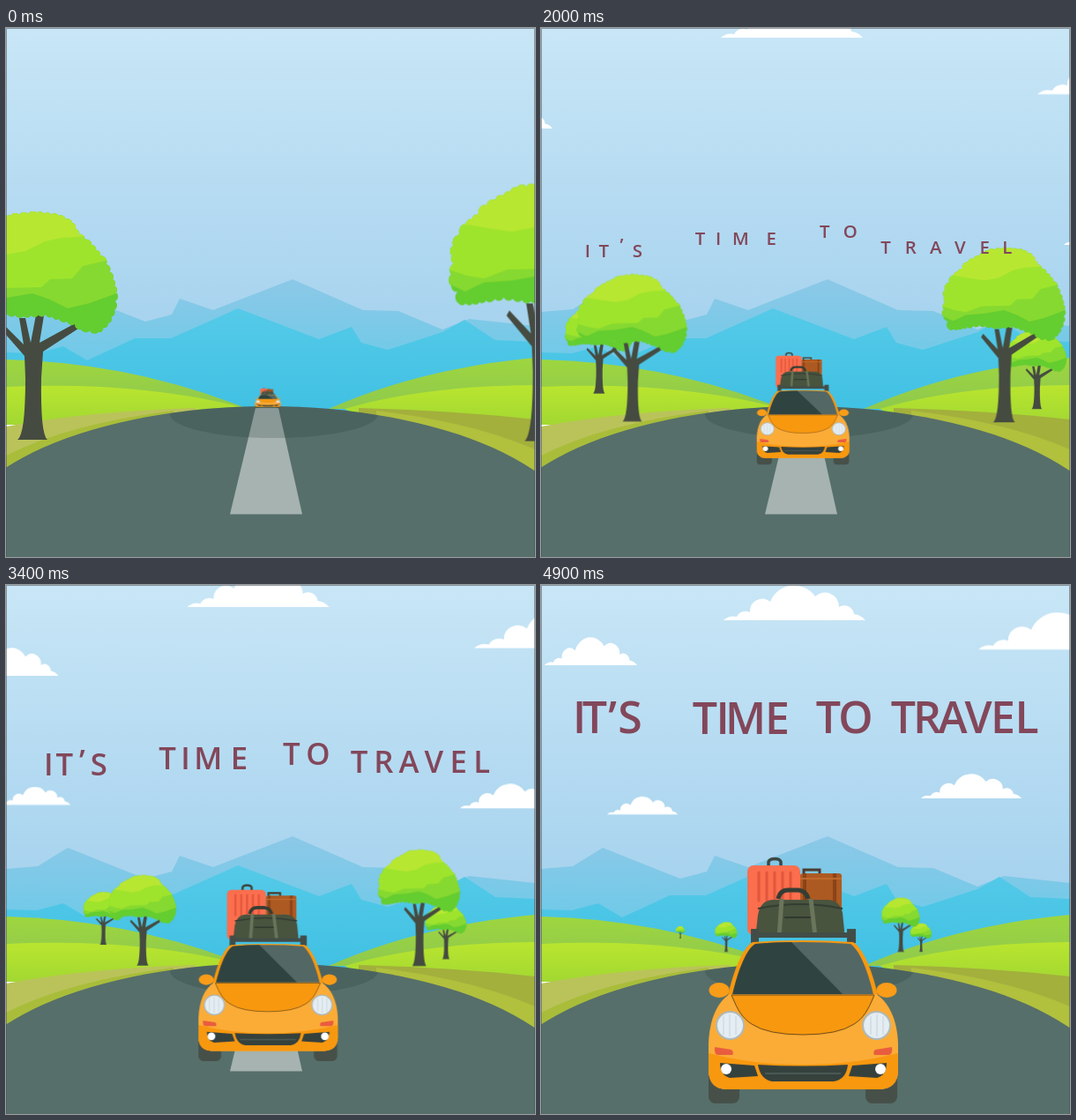
Animation of 600x600 px, one loop 5000 ms. Source, as an HTML page:

```html
<!DOCTYPE html>
<html lang="en">
<head>
<meta charset="utf-8">
<title>It's time to travel</title>
<style>
html, body { margin: 0; width: 100%; height: 100%; overflow: hidden; }
svg { display: block; width: 100vw; height: 100vh; }

/* Motion is stepped at ten pictures a second. */
.go { animation: go 5s steps(50) infinite; }
@keyframes go { from { transform: var(--a); } to { transform: var(--b); } }

#treeB { animation: treeB 5s infinite; }
@keyframes treeB {
  0% { transform: translate(-41px, 373.7px) scale(.63); animation-timing-function: steps(18); }
  36% { transform: translate(59.4px, 415.6px) scale(.42); animation-timing-function: steps(32); }
  100% { transform: translate(161.2px, 400.6px) scale(.042); }
}
#treeD { animation: treeD 5s infinite; }
@keyframes treeD {
  0% { transform: translate(730px, 450px) scale(.5); animation-timing-function: steps(14); }
  28% { transform: translate(589.5px, 435.5px) scale(.398); animation-timing-function: steps(36); }
  100% { transform: translate(426.5px, 415.4px) scale(.116); }
}
#cloudR { animation: cloudR 5s infinite; }
@keyframes cloudR {
  0% { transform: translate(609px, 86px); animation-timing-function: steps(20); }
  40% { transform: translate(563px, 75px); animation-timing-function: steps(8); }
  56% { transform: translate(544.5px, 72px); animation-timing-function: steps(11); }
  78% { transform: translate(519.5px, 71.2px); animation-timing-function: steps(11); }
  100% { transform: translate(493.7px, 73.2px); }
}
#lowL { animation: lowL 5s infinite; }
@keyframes lowL {
  0% { transform: translate(-193px, 212px); animation-timing-function: steps(28); }
  56% { transform: translate(-40px, 243px); animation-timing-function: steps(11); }
  78% { transform: translate(20px, 254px); animation-timing-function: steps(11); }
  100% { transform: translate(80.5px, 260.7px); }
}
#lowR { animation: lowR 5s infinite; }
@keyframes lowR {
  0% { transform: translate(704px, 228px); animation-timing-function: steps(20); }
  40% { transform: translate(593px, 246px); animation-timing-function: steps(8); }
  56% { transform: translate(549px, 252px); animation-timing-function: steps(6); }
  68% { transform: translate(515px, 253.3px); animation-timing-function: steps(5); }
  78% { transform: translate(487px, 252px); animation-timing-function: steps(11); }
  100% { transform: translate(425.5px, 241px); }
}
#words { font: 600 50px "Open Sans", "Noto Sans", sans-serif; fill: #83475a; text-anchor: middle; }
</style>
</head>
<body>
<svg viewBox="0 0 600 600">
  <defs>
    <linearGradient id="sky" x2="0" y2="1">
      <stop stop-color="#c8e6f6"/><stop offset="1" stop-color="#9dcdec"/>
    </linearGradient>
    <linearGradient id="far" x2="0" y2="1">
      <stop stop-color="#8cc8e7"/><stop offset=".6" stop-color="#6fcae8"/>
    </linearGradient>
    <linearGradient id="near" x2="0" y2="1">
      <stop stop-color="#55cae8"/><stop offset="1" stop-color="#3fc0e3"/>
    </linearGradient>
    <linearGradient id="hill" x2="0" y2="1">
      <stop stop-color="#9ed63f"/><stop offset="1" stop-color="#8fc94d"/>
    </linearGradient>
    <linearGradient id="meadow" x2="0" y2="1">
      <stop stop-color="#b9e52f"/><stop offset="1" stop-color="#a2d832"/>
    </linearGradient>
    <clipPath id="onRoad"><ellipse cx="297" cy="589" rx="360" ry="160"/></clipPath>
    <clipPath id="inCrown"><use href="#crown"/></clipPath>
    <path id="cloud" fill="#fff" d="M0 0Q6-6 15-4A11 11 0 0 1 30-9A14 14 0 0 1 53-21A29 29 0 0 1 104-27A16 16 0 0 1 131-15A11 11 0 0 1 148-7Q156-6 161 0Z"/>
    <g id="tree">
      <path fill="#454b40" d="M-17 0Q-8-6-8-70L-9-95-36-126-33-131-10-108-15-138H-8L-2-110 5-147H14L8-110 52-134 55-128 12-100 10-70Q9-6 17 0Z"/>
      <path id="crown" fill="#64cd30"/>
      <g clip-path="url(#inCrown)">
        <path fill="#86d930" d="M-120-280V-158L-98-158-80-150-60-159-30-161 0-166 20-159 40-149 65-155 110-171V-280Z"/>
        <path fill="#9fe42c" d="M-120-280V-172L-98-172-78-166-60-163-35-172 10-173 20-182 45-183 57-197 110-210V-280Z"/>
        <path fill="#b8e732" d="M-120-280V-216L-76-217-52-213-30-210-8-214 14-225 32-229 110-234V-280Z"/>
      </g>
    </g>
  </defs>

  <rect width="600" height="440" fill="url(#sky)"/>
  <path fill="url(#far)" d="M0 322L36 319 70 298 130 322 158 333 188 325 197 307 235 320 325 285 405 320 445 321 495 342 525 330 600 338V440H0Z"/>
  <path fill="url(#near)" d="M0 368L35 369 65 361 92 377 146 352 187 352 263 318 355 353 392 339 403 357 433 365 495 345 520 331 555 354 600 356V440H0Z"/>

  <path fill="url(#hill)" d="M0 376Q140 379 272 431H0Z"/>
  <path fill="url(#hill)" d="M600 374Q470 386 366 432H600Z"/>
  <path fill="url(#meadow)" d="M0 407Q150 400 272 431L180 450H0Z"/>
  <path fill="url(#meadow)" d="M600 405Q470 406 384 432L420 450H600Z"/>
  <path fill="#bac35a" d="M0 452Q90 435 215 431V520H0Z"/>
  <path fill="#a9bd3a" d="M0 485Q70 449 190 434V520H0Z"/>
  <path fill="#a3b03c" d="M600 444Q510 434 400 431V530H600Z"/>
  <path fill="#b1c03d" d="M600 478Q530 447 420 434V530H600Z"/>

  <ellipse cx="297" cy="589" rx="360" ry="160" fill="#566f6a"/>
  <rect y="588" width="600" height="12" fill="#566f6a"/>
  <path fill="#fff" opacity=".47" d="M283 431H309L336 551.500H254Z"/>
  <ellipse cx="304" cy="438" rx="118" ry="27" fill="#263a38" opacity=".22" clip-path="url(#onRoad)"/>

  <use href="#cloud" class="go" style="--a:translate(202.2px,-9px);--b:translate(207.1px,41px)"/>
  <g id="cloudR"><use href="#cloud" transform="scale(1.13 1.06)"/></g>
  <g class="go" style="--a:translate(-158px,129.9px);--b:translate(7.3px,90.2px)"><use href="#cloud" transform="scale(.652 .8)"/></g>
  <g id="lowL"><use href="#cloud" transform="scale(.5 .51)"/></g>
  <g id="lowR"><use href="#cloud" transform="scale(.708 .7)"/></g>

  <use href="#tree" id="treeB"/>
  <use href="#tree" class="go" style="--a:translate(30px,467px) scale(1);--b:translate(213.7px,415px) scale(.112)"/>
  <use href="#tree" id="treeD"/>
  <use href="#tree" class="go" style="--a:translate(606px,468.700px) scale(1.065,1.132);--b:translate(404px,415px) scale(.205,.218)"/>

  <g class="go" style="--a:translate(297px,431px) scale(.136,.082);--b:translate(297px,591.2px) scale(1.0176,1.0187)">
    <g transform="translate(-297 -588)">
      <g fill="#465049">
        <rect x="190" y="535" width="35" height="53" rx="8"/>
        <rect x="368" y="535" width="36" height="53" rx="8"/>
      </g>

      <path d="M258 319V314Q259 310.500 265 310.500T272 314V319" fill="none" stroke="#3c4641" stroke-width="3.500"/>
      <rect x="234" y="318" width="60" height="79" rx="7" fill="#fb6e4e"/>
      <path d="M247 326V358M256 326V358M265 326V358M274 326V358M283 326V358" stroke="#e2573b" stroke-width="3" stroke-linecap="round"/>
      <path d="M298 329V323H316V329" fill="none" stroke="#4a3a2c" stroke-width="3"/>
      <rect x="294" y="327" width="47" height="70" rx="3" fill="#ad5a22"/>
      <path d="M299 327V395M333 327V395" stroke="#8b4318" stroke-width="4"/>
      <path d="M294 333H341" stroke="#c06a2c" stroke-width="2"/>
      <path d="M269 356Q271 346 280 346H292Q301 347 303 356" fill="none" stroke="#343d33" stroke-width="5"/>
      <path fill="#49543f" d="M246 374Q249 358 262 357H326Q339 358 342 372L344 392Q344 399 338 399H251Q244 399 244 392Z"/>
      <path d="M246 367Q294 357 342 367" fill="none" stroke="#343d33" stroke-width="2"/>
      <path d="M273 356L270 399M306 356L311 399" stroke="#6a755c" stroke-width="5"/>
      <path d="M276 377H306" stroke="#2f382e" stroke-width="2"/>

      <path fill="#424d48" d="M238 390H247V394H347V390H357V406H347V400H247V406H238Z"/>

      <ellipse cx="202" cy="459.500" rx="11.500" ry="8.500" fill="#f99c18"/>
      <ellipse cx="392" cy="459.500" rx="11.500" ry="8.500" fill="#f99c18"/>
      <path fill="#f8980f" d="M211 470C219 432 231 409 240 405Q297 401 354 405C363 410 375 432 383 470Z"/>
      <path fill="#536765" d="M217 465C224 434 234 412 243 407Q297 403 351 407C360 413 370 434 377 465Z"/>
      <path fill="#2f4341" d="M217 465C224 434 234 412 243 407Q262 405 284 405L343 465Z"/>

      <path fill="#fbac37" d="M214 464H380C394 473 404 492 405 520V552Q404 571 384 572H210Q191 571 190 552V520C191 492 200 473 214 464Z"/>
      <path fill="#f8980f" stroke="#6b4a1b" stroke-width="1" d="M216 465H378C371 482 366 491 355 498Q337 510 297 510T239 498C228 491 223 482 216 465Z"/>
      <path fill="#f8980f" d="M190 531Q240 544 297 544T405 531V552Q404 571 384 572H210Q191 571 190 552Z"/>

      <g id="side">
        <circle cx="214.500" cy="499.500" r="15.500" fill="#e4edf2" stroke="#aeb9ba" stroke-width="2"/>
        <path d="M214 487V512M207 489V510M221 489V510" stroke="#d0dce3" stroke-width="1.500"/>
        <path fill="#e95d3f" d="M197 524L216 527Q219 530 217 533H200Q196 531 197 524Z"/>
        <path fill="#35413d" d="M203 542L242 545 246 557 214 559Q203 556 203 542Z"/>
        <circle cx="210" cy="549" r="6" fill="#fff"/>
      </g>
      <use href="#side" transform="translate(595) scale(-1 1)"/>
      <path fill="#35413d" d="M246 544Q297 547 348 544 346 561 332 563H262Q249 561 246 544Z"/>
      <path d="M254 554H340" stroke="#4c5955" stroke-width="2"/>
    </g>
  </g>

  <g id="words"></g>
  <path d="M.5 600V.5H599.500V600" fill="none" stroke="#455660" opacity=".55"/>
</svg>

<script>
// Turns a clockwise outline into a row of small leafy bumps.
function scallop(pts) {
  let d = `M${pts[0]}`;
  pts.forEach(([x, y], i) => {
    const [nx, ny] = pts[(i + 1) % pts.length];
    const len = Math.hypot(nx - x, ny - y);
    const n = Math.max(1, Math.round(len / 9));
    const r = len / n * .62;
    d += `a${r} ${r} 0 0 1 ${(nx - x) / n} ${(ny - y) / n}`.repeat(n);
  });
  return d + "Z";
}
document.getElementById("crown").setAttribute("d", scallop([
  [5, -257], [30, -254], [45, -246], [52, -233], [67, -221], [77, -209], [84, -199],
  [91, -182], [95, -167], [93, -147], [86, -132], [75, -122], [55, -125], [48, -131],
  [30, -137], [15, -142], [-10, -140], [-39, -144], [-58, -141], [-72, -138], [-87, -138],
  [-88, -150], [-95, -156], [-95, -167], [-92, -178], [-94, -186], [-93, -196],
  [-86, -207], [-79, -218], [-66, -227], [-57, -237], [-39, -246], [-25, -254]
]));

// Each word: baseline and letter centres at 0.7 s, then at 4.9 s.
const words = [
  ["IT’S", 301, 168, [57, 76, 96, 113], [43.5, 61, 81, 101]],
  ["TIME", 281, 169, [178, 199, 224, 258], [186, 206, 232, 268]],
  ["TO", 270, 168, [320, 348], [326, 357]],
  ["TRAVEL", 295, 168, [382, 411, 439, 466, 494, 519], [411, 438, 467, 496, 524, 551]]
];
const at = (a, b, t) => a + (b - a) * (t - .7) / 4.2;
const group = document.getElementById("words");
for (const [word, y0, y1, from, to] of words) {
  [...word].forEach((ch, i) => {
    const lift = ch === "’" ? 10 : 0;
    const pose = t => `translate(${at(from[i], to[i], t)}px,${at(y0 - lift, y1, t)}px) scale(${t / 4.9})`;
    const el = document.createElementNS("http://www.w3.org/2000/svg", "text");
    el.textContent = ch;
    el.style.setProperty("--a", pose(0));
    el.style.setProperty("--b", pose(5));
    el.setAttribute("class", "go");
    group.append(el);
  });
}
</script>
</body>
</html>
```
